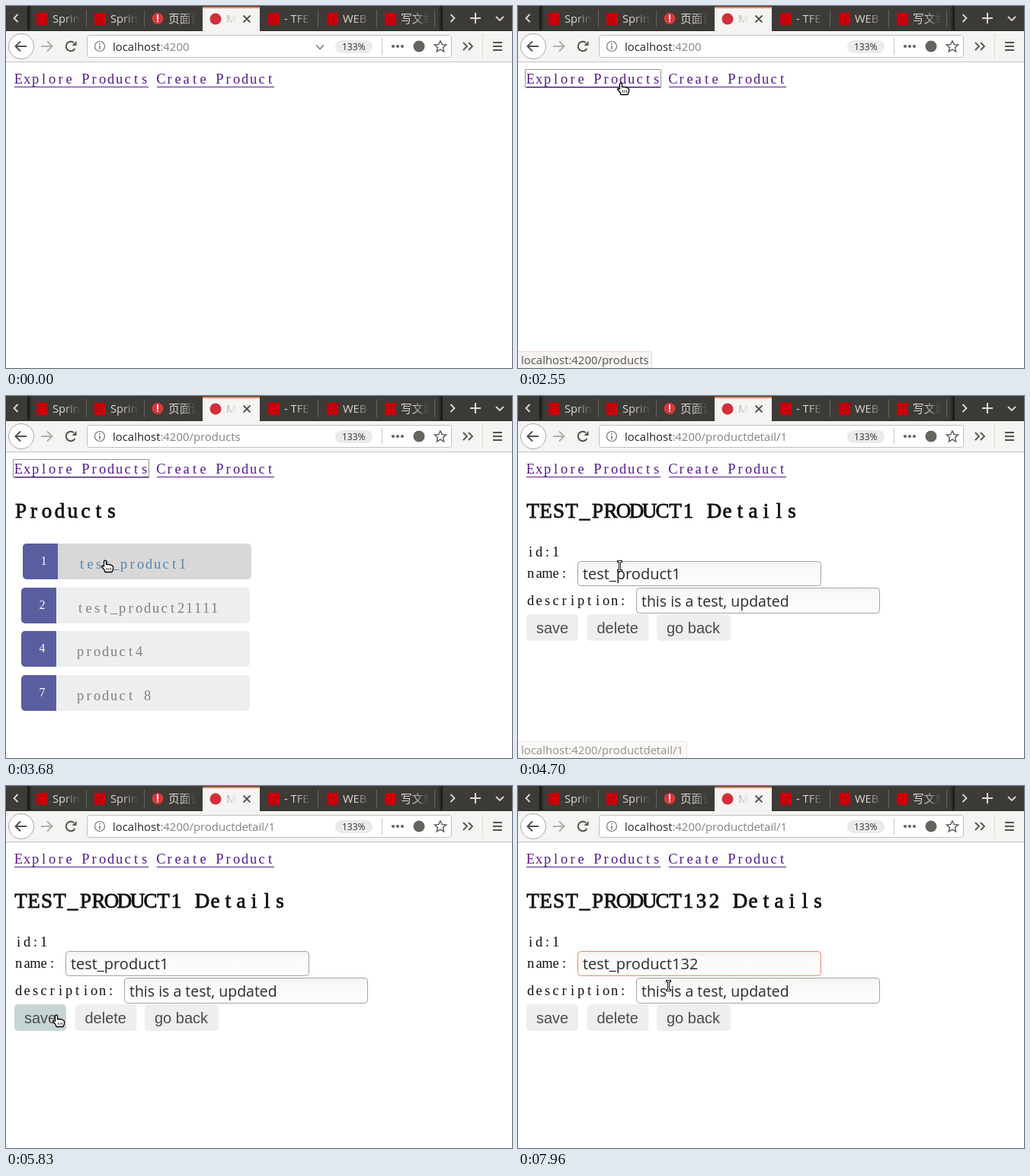
An HTML page with a canvas that plays this animation: 664x476 px, repeating every 8000 ms.

```html
<!DOCTYPE html>
<html lang="en">
<head>
<meta charset="utf-8">
<title>Product list</title>
<style>
html, body { margin: 0; width: 664px; height: 476px; overflow: hidden; background: #fff; }
canvas { display: block; }
</style>
</head>
<body>
<canvas id="stage" width="664" height="476"></canvas>
<script>
const g = document.getElementById('stage').getContext('2d');
const LOOP = 8000;
const UI = '"Open Sans", "Noto Sans CJK SC", "Noto Sans CJK", sans-serif';
const SERIF = '"Liberation Serif", "Noto Serif", serif';
const SANS = '"Liberation Sans", Arial, sans-serif';
const DARK = '#3c3b37', BAR = '#f5f4f2', ICON = '#55534f';

// Pointer path: time, x, y of the hot spot
const PATH = [
  [1260, 318, 84], [1500, 232, 89], [1740, 174, 91], [2060, 138, 102], [2150, 138, 102],
  [2270, 135, 102], [3120, 135, 102], [3360, 137, 150], [3560, 134, 203], [3680, 130, 217],
  [3920, 131, 220], [4200, 131, 220], [4240, 133, 223], [4700, 133, 223], [5390, 122, 251],
  [5560, 96, 276], [5720, 70, 300], [5830, 66, 302], [5900, 67, 303], [6040, 130, 307],
  [6160, 218, 306], [6220, 234, 298], [6260, 238, 270], [6300, 240, 244], [6560, 240, 244],
  [6570, 240, 230], [7740, 240, 230], [7820, 228, 240], [7960, 197, 262]
];

const BUTTONS = [['save', 11, 68], ['delete', 90.5, 81], ['go back', 182, 97]];
const ITEMS = [['1', 'test_product1'], ['2', 'test_product21111'], ['4', 'product4'], ['7', 'product 8']];

function pointer(t) {
  let i = 1;
  while (i < PATH.length - 1 && PATH[i][0] < t) i++;
  const [t0, x0, y0] = PATH[i - 1], [t1, x1, y1] = PATH[i];
  const k = Math.min(1, Math.max(0, (t - t0) / (t1 - t0)));
  return { x: Math.round(x0 + (x1 - x0) * k), y: Math.round(y0 + (y1 - y0) * k) };
}

const inside = (p, x, y, w, h) => p.x >= x && p.x < x + w && p.y >= y && p.y < y + h;

function rect(x, y, w, h, fill) {
  g.fillStyle = fill;
  g.fillRect(x, y, w, h);
}

function box(x, y, w, h, r, fill, stroke) {
  g.beginPath();
  g.roundRect(x, y, w, h, r);
  g.fillStyle = fill;
  g.fill();
  if (stroke) {
    g.strokeStyle = stroke;
    g.lineWidth = 1;
    g.stroke();
  }
}

function line(points, color, width = 1) {
  g.beginPath();
  for (const [x, y] of points) g.lineTo(x, y);
  g.strokeStyle = color;
  g.lineWidth = width;
  g.stroke();
}

function disc(x, y, r, fill, stroke, width = 1) {
  g.beginPath();
  g.arc(x, y, r, 0, 7);
  if (fill) { g.fillStyle = fill; g.fill(); }
  if (stroke) { g.strokeStyle = stroke; g.lineWidth = width; g.stroke(); }
}

function text(s, x, y, size, family, color) {
  g.font = size + 'px ' + family;
  g.fillStyle = color;
  g.fillText(s, x, y);
}

// Serif letters, each centred in a cell of fixed width
function cells(s, x, y, size, cell, color, bold) {
  g.textAlign = 'center';
  [...s].forEach((c, i) => {
    const cx = x + (i + 0.5) * cell;
    text(c, cx, y, size, SERIF, color);
    if (bold) {
      g.strokeStyle = color;
      g.lineWidth = bold;
      g.strokeText(c, cx, y);
    }
  });
  g.textAlign = 'left';
}

const mono = (s, x, y, color) => cells(s, x, y, 18.5, 11, color);
const heading = s => cells(s, 11, 159.5, 27, 17, '#111', 0.8);

function dotted(x, y, w, h) {
  g.setLineDash([1, 1]);
  g.lineDashOffset = 0.5;
  g.strokeStyle = '#222';
  g.lineWidth = 1;
  g.strokeRect(x + 0.5, y + 0.5, w - 1, h - 1);
  g.setLineDash([]);
}

function chevron(x, y, dx, dy, color, width) {
  const turn = dx ? [[x - dx, y - 5], [x + dx, y], [x - dx, y + 5]] : [[x - 5, y - dy], [x, y + dy], [x + 5, y - dy]];
  line(turn, color, width);
}

function tabLabel(s, x, w, color, back) {
  g.save();
  g.beginPath();
  g.rect(x, 4, w, 28);
  g.clip();
  text(s, x, 21.5, 14.7, UI, color);
  const fade = g.createLinearGradient(x + w - 22, 0, x + w, 0);
  fade.addColorStop(0, back + '00');
  fade.addColorStop(1, back);
  rect(x + w - 22, 4, 22, 28, fade);
  g.restore();
}

function tabs() {
  rect(0, 0, 664, 33, DARK);
  rect(0, 32, 664, 1, '#2b2a27');
  const names = ['Spring', 'Spring', '页面访', 'My', '- TFE', 'WEB', '写文章'];
  names.forEach((name, i) => {
    const x = 29 + Math.round(i * 76.1), on = i === 3;
    if (on) {
      rect(258, 1, 75, 33, BAR);
      rect(258, 1, 75, 2, '#e9885c');
    } else if (i !== 2) {
      rect(x + 76, 5, 1, 23, '#66645e');
    }
    if (i === 2) {
      disc(199, 16.5, 7.5, '#d63a38');
      rect(198, 11, 2, 7, '#fff');
      rect(198, 19, 2, 2, '#fff');
    } else if (on) {
      disc(275, 17, 7.5, '#d32f3a');
    } else {
      rect(x + 11, 9, 15, 16, '#c8000a');
    }
    tabLabel(name, x + 32, on ? 15 : 37, on ? '#8d8a86' : '#dfdbd2', on ? BAR : DARK);
  });
  rect(181, 5, 1, 23, '#66645e');
  line([[311.5, 12.5], [320.5, 21.5]], ICON, 1.8);
  line([[320.5, 12.5], [311.5, 21.5]], ICON, 1.8);
  for (const [x, dir] of [[28, 1], [573, -1]]) {
    const shade = g.createLinearGradient(x, 0, x + dir * 6, 0);
    shade.addColorStop(0, '#151412');
    shade.addColorStop(1, '#15141200');
    rect(Math.min(x, x + dir * 6), 0, 6, 32, shade);
  }
  chevron(13, 16, -2.5, 0, '#dfdbd2', 1.8);
  chevron(586, 16, 2.5, 0, '#dfdbd2', 1.8);
  line([[609, 16], [623, 16]], '#dfdbd2', 2);
  line([[616, 9], [616, 23]], '#dfdbd2', 2);
  chevron(648, 16.5, 0, 2.5, '#dfdbd2', 1.8);
}

function arrow(x, dir, color) {
  line([[x - 7 * dir, 53], [x + 7 * dir, 53]], color, 2);
  line([[x + dir, 46.5], [x + 7.5 * dir, 53], [x + dir, 59.5]], color, 2);
}

function star(cx, cy) {
  const pts = [];
  for (let i = 0; i <= 10; i++) {
    const a = i * Math.PI / 5 - Math.PI / 2, r = i % 2 ? 3.7 : 8;
    pts.push([cx + r * Math.cos(a), cy + r * Math.sin(a)]);
  }
  line(pts, '#66645f', 1.5);
}

function toolbar(t, path) {
  rect(0, 33, 664, 40, BAR);
  rect(258, 32, 75, 2, BAR);
  rect(0, 73, 664, 1, '#c6c4c1');
  disc(20, 53, 16.5, '#fff', '#aaa7a3');
  arrow(20, -1, ICON);
  arrow(53, 1, '#b3b0ac');
  g.beginPath();
  g.arc(85, 53, 6.2, 0.5, 5.4);
  g.strokeStyle = ICON;
  g.lineWidth = 2;
  g.stroke();
  g.beginPath();
  g.moveTo(92.5, 46);
  g.lineTo(92.5, 52);
  g.lineTo(86.5, 52);
  g.fillStyle = ICON;
  g.fill();

  box(106.5, 38.5, 478, 29, 3, '#fff', '#c3c0bc');
  disc(123, 53, 6.5, null, '#77746f', 1.2);
  rect(122.3, 52, 1.5, 5, '#77746f');
  rect(122.3, 49, 1.5, 1.7, '#77746f');
  text('localhost', 140, 58.5, 14.9, UI, '#24221f');
  const w = g.measureText('localhost').width;
  text(':4200' + path, 140 + w, 58.5, 14.9, UI, '#85827e');

  g.globalAlpha = Math.min(1, Math.max(0, 1 - (t - 1260) / 150));
  chevron(412, 54, 0, 2.5, '#77746f', 1.5);
  g.globalAlpha = 1;
  box(432, 45, 49, 17, 8.5, '#ebebeb');
  text('133%', 441, 58, 12, UI, '#302e2b');
  rect(493, 42, 1, 22, '#cbc9c6');
  for (let i = 0; i < 3; i++) disc(508 + i * 6, 53, 2.1, '#66645f');
  disc(542, 53, 7.5, '#66645f');
  star(570, 53.5);
  chevron(602.5, 53, 2.5, 0, ICON, 1.8);
  chevron(609.5, 53, 2.5, 0, ICON, 1.8);
  rect(625, 37, 1, 32, '#dcdad7');
  for (let i = 0; i < 3; i++) rect(639, 47 + i * 5, 12, 2, ICON);
}

function links() {
  for (const [s, x] of [['Explore Products', 11], ['Create Product', 198]]) {
    mono(s, x, 102, '#551a8b');
    rect(x, 106, s.length * 11, 1, '#551a8b');
  }
}

function list(p) {
  ITEMS.forEach(([id, name], i) => {
    const y = 194 + Math.round(i * 57.6), over = inside(p, 20, y, 302, 47), x = over ? 22 : 20;
    box(x, y, 300, 47, 5, over ? '#d9d8d7' : '#eee');
    box(x, y, 46, 47, [5, 0, 0, 5], '#5a5d9f');
    cells(id, x + 23, y + 28, 16, 9, '#fff');
    mono(name, x + 72, y + 33, over ? '#4f86b5' : '#808080');
  });
}

function field(x, y, h, s, size, focus) {
  const fill = g.createLinearGradient(0, y, 0, y + h);
  fill.addColorStop(0, '#f1f0ef');
  fill.addColorStop(0.2, '#f8f8f7');
  fill.addColorStop(1, '#fefefe');
  box(x + 0.5, y + 0.5, 319, h - 1, 4, fill, focus ? '#ea8a68' : '#a5a3a0');
  text(s, x + 7, y + h - 9, size, UI, '#2b2b2b');
}

function details(t, p) {
  const n = t < 7600 ? '1' : '132';
  heading('TEST_PRODUCT' + n + ' Details');
  mono('id:1', 11, 211, '#111');
  mono('name:', 11, 239, '#111');
  mono('description:', 11, 275, '#111');
  field(78, 217, 33, 'test_product' + n, 20, t >= 6570);
  field(155, 252, 34, 'this is a test, updated', 19.5, false);
  if (t >= 6570 && t < 7600) rect(215, 223, 1, 21, '#333');
  for (const [s, x, w] of BUTTONS) {
    box(x, 287, w, 35, 5, inside(p, x, 287, w, 35) ? '#c7d6d5' : '#eee');
    text(s, x + 13, 312, 20, SANS, '#4b4b4f');
  }
}

function status(s, alpha) {
  g.globalAlpha = alpha;
  g.font = '14.9px ' + UI;
  const w = Math.round(g.measureText(s).width) + 9;
  box(-0.5, 454.5, w, 22, [0, 3, 0, 0], '#f7f5f3', '#ecd3cc');
  text(s, 4, 471, 14.9, UI, '#55524e');
  g.globalAlpha = 1;
}

function shape(points, x, y) {
  g.beginPath();
  for (const [a, b] of points) g.lineTo(x + a, y + b);
  g.closePath();
  g.lineJoin = 'round';
  g.fillStyle = '#fff';
  g.strokeStyle = '#000';
  g.lineWidth = 1.3;
  g.fill();
  g.stroke();
  g.lineJoin = 'miter';
}

const HAND = [[-1.5, 0], [0, -1], [1.5, 0], [1.5, 4.5], [4.5, 4.5], [8, 5.2], [10.5, 7],
  [10.5, 11], [9, 14.5], [0, 14.5], [-1, 11.5], [-4.5, 7.5], [-3.5, 6], [-1.5, 7.2]];
const ARROW = [[0, 0], [0, 14], [3.3, 11], [5.5, 16], [8, 15], [5.8, 10], [10, 10]];

function ibeam(x, y) {
  for (const [color, e] of [['#111', 1], ['#fff', 0]]) {
    rect(x - e, y - 6 - e, 1 + 2 * e, 13 + 2 * e, color);
    for (const end of [-6, 6]) rect(x - 2 - e, y + end - e, 5 + 2 * e, 1 + 2 * e, color);
  }
}

function drawPointer(t, p) {
  const isDetail = t >= 4620;
  const onLink = inside(p, 11, 86, 176, 22) || inside(p, 198, 86, 154, 22);
  const onItem = !isDetail && t >= 3120 && inside(p, 20, 194, 302, 47);
  const onButton = isDetail && BUTTONS.some(([, x, w]) => inside(p, x, 287, w, 35));
  const onText = isDetail ? p.y < 287 : t >= 2640 && inside(p, 11, 134, 136, 34);
  if (onLink || onItem || onButton) {
    shape(HAND, p.x, p.y);
    for (let i = 0; i < 3; i++) rect(p.x + 2 + i * 2.5, p.y + 9, 1, 3, '#333');
  } else if (onText) ibeam(p.x, p.y);
  else shape(ARROW, p.x, p.y);
}

function draw(t) {
  const p = pointer(t);
  rect(0, 0, 664, 476, '#fff');
  tabs();
  toolbar(t, t < 2640 ? '' : t < 4620 ? '/products' : '/productdetail/1');
  links();
  if (t >= 2550 && t < 4460) dotted(9, 83, 179, 25);
  if (t >= 4620) details(t, p);
  else if (t >= 2640) {
    heading('Products');
    if (t >= 3120) list(p);
    if (t >= 4460) dotted(22, 193, 336, 49);
  }
  if (t >= 2150 && t < 3120) status('localhost:4200/products', Math.min(1, 0.4 + (t - 2150) / 200));
  if (t >= 3900 && t < 4800) {
    const fade = t < 4620 ? Math.min(1, 0.4 + (t - 3900) / 100) : 1 - (t - 4620) / 220;
    status('localhost:4200/productdetail/1', fade);
  }
  if (t >= 1260) drawPointer(t, p);
}

const start = performance.now();
function tick() {
  draw((performance.now() - start) % LOOP);
  requestAnimationFrame(tick);
}
tick();
</script>
</body>
</html>
```
